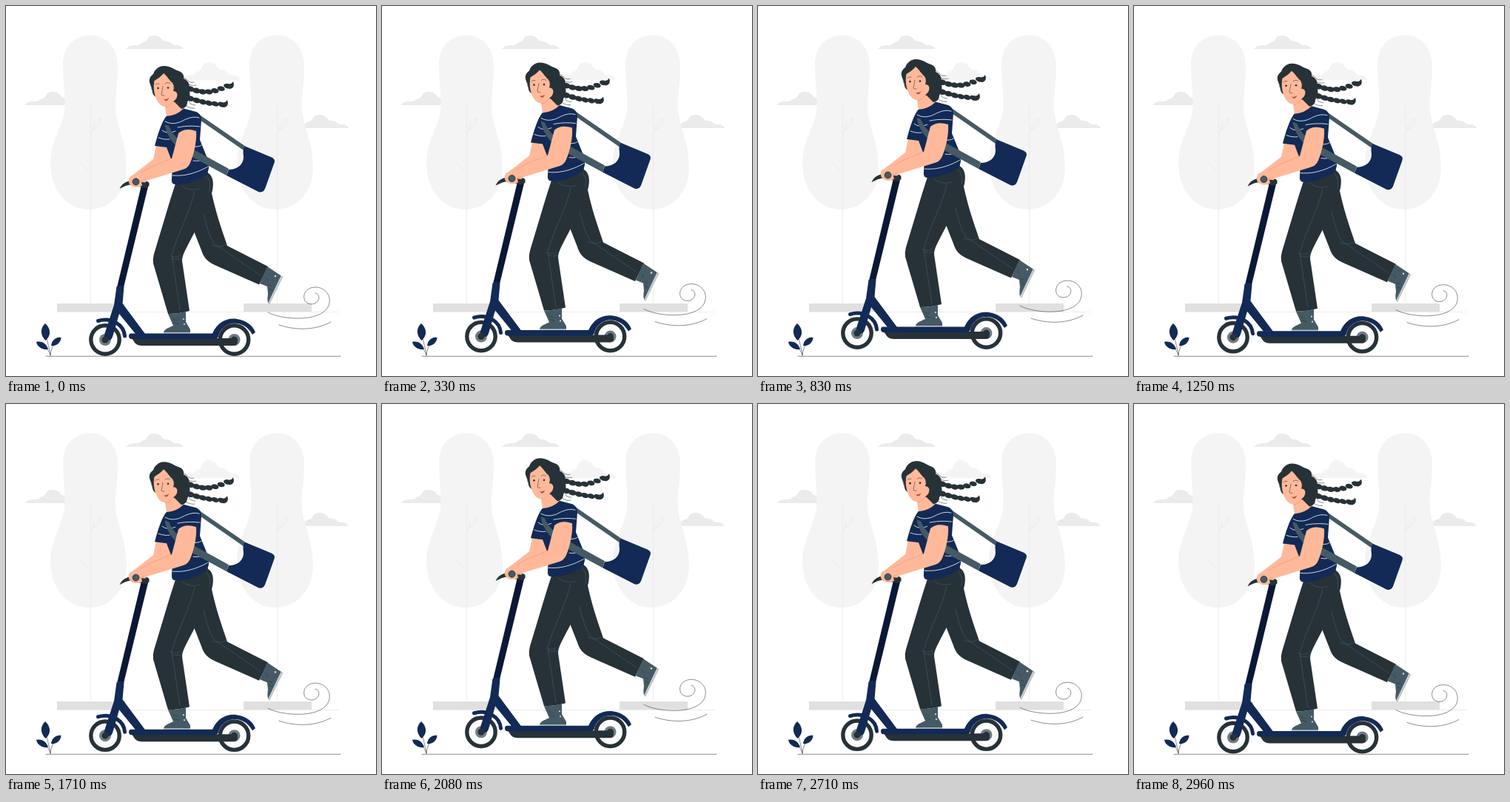
Write an HTML page that moves like this. It is 500 px wide and 500 px high and loops after 3000 ms.

```html
<!DOCTYPE html>
<html lang="en">
<head>
<meta charset="utf-8">
<title>Scooter ride</title>
<style>
  html, body { margin: 0; width: 100%; height: 100%; overflow: hidden; background: #fff; }
  svg { display: block; width: 100vw; height: 100vh; }
  .line { fill: none; stroke-linecap: round; stroke-linejoin: round; }
  .ink { stroke: #263238; stroke-width: .55; }
  .faint { stroke: #e6e6e6; stroke-width: .7; }
  .seam { stroke: #51636c; stroke-width: .5; }
  .stripe { stroke: #fff; stroke-width: .8; }
  .navy { fill: #122a55; }
  .dark { fill: #263238; }
  .grey { fill: #455a64; }
  .skin { fill: #ffb99a; }
</style>
</head>
<body>
<svg viewBox="0 0 500 500">
  <defs>
    <g id="tree">
      <path fill="#f4f4f4" d="M113.500 39.500C135 39.500 151 55 151 82C151 107 147 122 148 140C150 163 163 186 163 218C163 250 142 275 113 275C81 275 60 247 60 213C60 185 76 163 79 142C81 122 77 105 77 80C77 55 92 39.500 113.500 39.500Z"/>
      <path class="line faint" d="M114.500 136V402M114.500 174L118 166M118 166C116 159 121 154 128 153C129 159 126 165 118 166L126 156M98 210L112 223"/>
      <path fill="#e0e0e0" d="M69 402H161V413H69Z"/>
    </g>
    <path id="cloud" d="M0 18C2 14 7 13 14 13C20 13 20 9 24 9C28 9 27 4 32 1C40 -2 47 2 49 6C52 9 55 7 59 9C63 11 62 13 67 13C73 13 76 15 77 18Z"/>
    <g id="wheel">
      <circle r="19.200" fill="#fff" stroke="#263238" stroke-width="5.400"/>
      <circle r="13.500" fill="none" stroke="#ebebeb" stroke-width=".5"/>
      <circle r="8" fill="#6d7d85"/>
      <circle r="4.500" class="dark"/>
    </g>
  </defs>

  <g fill="#ebebeb">
    <use href="#cloud" x="162.500" y="40"/>
    <use href="#cloud" x="25.500" y="116"/>
    <use href="#cloud" x="386" y="147"/>
    <use href="#cloud" transform="translate(235 76) scale(1.05 1.35)" fill="#f4f4f4"/>
  </g>
  <use href="#tree"/>
  <use href="#tree" x="252"/>
  <path class="line faint" d="M69 413.500H449"/>
  <path class="line ink" d="M54 473.300H452"/>

  <g class="navy">
    <path d="M53.500 452C46 445 46 435 53 429C61 436 61 446 53.500 452Z"/>
    <path d="M57 464C48 465 42 460 41 454C49 452 55 457 57 464Z"/>
    <path d="M61 459C62 451 68 447 74.500 448C74 455 68 460 61 459Z"/>
    <path class="line ink" d="M53 440C55 452 59 463 60 472M49 458Q58 464 60 472M69 452Q61 460 60 472"/>
  </g>

  <g id="rider">
    <path class="line ink" d="M354 414C372 424 423 428 435 407C442 393 432 380 418 380C407 380 401 388 403 396C405 404 417 405 421 399C425 394 422 388 418 388M369 431C393 439 419 438 439 427"/>

    <!-- bag and rear strap -->
    <path class="grey" d="M257 143L263 148L324 190L321 195L259 152Z"/>
    <path class="navy" d="M323 189.500L359 204.500Q364.500 207 362.500 212L350 247Q347 253 341 251L298 229L301 221C313 221 320.500 214 321 205C321 199 319 195 323 189.500Z"/>

    <!-- legs -->
    <path class="dark" d="M272 220C280 273 291 299 299 324L354 352L342 376.500L282 350C271 345 267 339 264 330L253 302L250 245Z"/>
    <path class="dark" d="M230 237L240 225H272C280 229 281 239 279 249C274 274 251 311 240 335Q237 342 238.500 348L248 412Q234 416 219 416L199 348Q198 342 200 335C210 302 220 267 230 237Z"/>
    <path class="line seam" d="M238 243Q247 251 263 247M271 230Q278 238 275 250M255 250C249 279 231 309 224 337L235 411M222 337Q228 342 236 337M224 341Q230 344 237 341M267 282C272 300 274 310 281 321L344 364M278 323Q290 328 297 322"/>

    <!-- shoes -->
    <path class="grey" d="M219 416Q232 416 243 413L243 427L249 437V442H213C213 437 219 435 226 432Z"/>
    <path fill="#c5ccd0" d="M213 441H249V443H213Z"/>
    <path class="grey" d="M353 352L374 366L356 403Q352 401 354 389L353 379L343 375Z"/>
    <path fill="#c5ccd0" d="M371.500 364.500L374 366L356 403L354 401.500Z"/>
    <g fill="#d5dadd">
      <circle cx="240" cy="423" r="1.100"/><circle cx="241" cy="430" r="1.100"/>
      <circle cx="364" cy="365" r="1.300"/>
    </g>
    <path class="line ink" d="M226 423L231 425M227 428L233 430M351 367L354 371M355 377L359 379M356 383L360 385"/>

    <!-- scooter -->
    <use href="#wheel" x="134" y="451"/>
    <use href="#wheel" x="308.500" y="451"/>
    <path class="dark" d="M170 449H307Q313 449 313 454Q313 459 307 459H184Q177 459 174 455Z"/>
    <path class="navy" d="M169 442.500H279C286 427 299 421 312 423C326 425 334 433 337 441L333 444C326 432 316 428 306 429C296 430 289 438 287 446Q286 450 281 450H170Q166 450 166 446Q166 442.500 169 442.500Z"/>
    <path fill="none" stroke="#122a55" stroke-width="5" stroke-linecap="round" d="M124.500 425.500C143 420 159.500 431 160.500 446"/>
    <path fill="#0a1836" d="M183.500 240H193L159 380H150Z"/>
    <path class="navy" d="M149.500 379Q154 376 159.500 379L157.500 402L188 443H175L153 416L144 447Q142 453 136 451Q132 449 133 444L146 404Z"/>
    <circle cx="135" cy="450" r="3.500" class="dark"/>
    <path class="dark" d="M153.500 247C157 240 162 236 172 236L191 237Q194 238 193.500 243L189 246L171 242C164 241 160 244 153.500 247Z"/>

    <!-- torso -->
    <path class="skin" d="M203 188H218L224 208L181 237L168 231L199 207Z"/>
    <path class="skin" d="M214 130L235 120L241 142Q230 153 217 149Z"/>
    <path class="navy" d="M216.500 149Q231 148 240 138.500L257 143Q264 146 264 154L262 181L271 203Q274.500 209 274 219Q273 225 270 228C259 236 243 242 228 241Q223 240 224 233L225 212L217 191L201 189C205 174 210 157 216.500 149Z"/>
    <path class="line stripe" d="M215 156Q226 162 239 155T261 151M211 168Q218 174 229 169M232 164Q247 161 262 163M206 178Q214 181 221 180M252 190Q260 191 264 188M225 216Q235 222 244 218M253 209Q263 211 270 205M225 229Q248 231 273 217" stroke-dasharray="9 .8"/>
    <path class="grey" d="M214.500 160L220 162C225 176 240 187 252 193L301 220L298 229L246 201C232 193 218 180 214.500 160Z"/>

    <!-- near arm -->
    <path class="skin" d="M233 172Q242 164 257 169C258 183 254 200 249 212Q246 219 239 221L190 236C186 245 174 248 167 241Q164 235 168 230L176 228L190 225L224 206Z"/>
    <path class="line" stroke="#e59578" stroke-width=".6" d="M182 225L197 217L222 207M182 237L188 235M170 242L167 239"/>
    <path class="dark" d="M183 238L193.500 239L191 245L184 243Z"/>
    <circle cx="175.500" cy="237.500" r="4.500" fill="#455a64" stroke="#263238" stroke-width=".8"/>

    <!-- head -->
    <g id="braids" class="dark"></g>
    <path class="dark" d="M199 92C201 86 206 81.500 213 81C221 80.500 226 85 231 87C239 89 241 94 240 98C247 101 249 107 247 112C250 119 248 126 245 130C245 135 242 138 237 139L228 130L201 122C196 117 199 113 195 106C192 99 195 95 199 92Z"/>
    <path class="skin" d="M200.500 101C205 98 210 95 213 91C218 95 221 101 225 104Q228 109 226 115Q231 115 231.500 120Q231 126 227 128C223 135 216 138 211 135C202 130 198 114 200.500 101Z"/>
    <path class="line" stroke="#e59578" stroke-width=".7" d="M216 136.500Q223 135 227 128"/>
    <path class="line ink" d="M202 106Q204 104 207 105M215 105Q219 102 222 105M212 109L210 120Q212 122 214 121"/>
    <g class="dark"><circle cx="205.500" cy="111" r="1.300"/><circle cx="219" cy="110.500" r="1.300"/></g>
    <path d="M213 125.500Q217 127 220 124Q219 129 215 128Z" fill="#b65348"/>
    <path class="line ink" d="M237 96C246 96 244 105 254 103M242 103Q249 109 257 107M199 93C192 97 196 107 197 113M245 125Q250 123 248 128T256 134M242 134Q248 139 255 138"/>
  </g>
</svg>
<script>
  const LOOP = 1500, LIFT = 10;
  const rider = document.getElementById('rider');

  // A braid is a row of overlapping beads along a bowed line, ending in a tuft.
  function braid(x0, y0, x1, y1, bow, beads) {
    let shapes = '';
    for (let i = 0; i <= beads; i++) {
      const k = i / beads;
      const x = x0 + (x1 - x0) * k;
      const y = y0 + (y1 - y0) * k + bow * Math.sin(Math.PI * k);
      const tilt = 14 + (y1 - y0) * k;
      shapes += `<ellipse rx="${5.6 - k * .6}" ry="${3.7 - k * .6}" transform="translate(${x} ${y}) rotate(${tilt})"/>`;
    }
    return shapes + `<path d="M${x1 - 2} ${y1 - 3}Q${x1 + 5} ${y1 - 1} ${x1 + 8} ${y1 - 6}Q${x1 + 11} ${y1 + 2} ${x1 + 4} ${y1 + 4}L${x1 - 2} ${y1 + 3}Z"/>`;
  }
  document.getElementById('braids').innerHTML =
    braid(249, 112, 299, 108, 6, 6) + braid(249, 125, 291, 133, 1.5, 5);

  function draw(time) {
    const phase = (time % LOOP) / LOOP;
    const rise = LIFT * (1 - Math.abs(2 * phase - 1));
    rider.setAttribute('transform', `translate(0 ${-rise})`);
  }

  const start = performance.now();
  function tick(now) {
    draw(Math.max(0, now - start));
    requestAnimationFrame(tick);
  }
  draw(0);
  requestAnimationFrame(tick);
</script>
</body>
</html>
```
